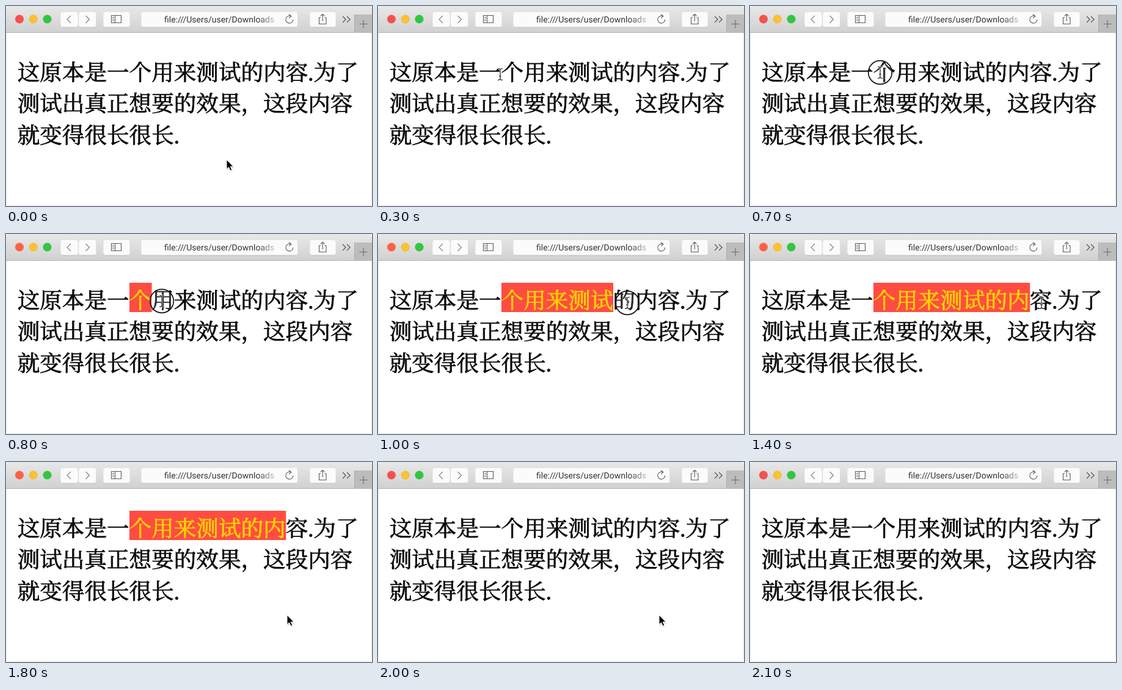
An HTML page that plays this animation: 599 px wide and 328 px high, repeating every 2.2 s.

```html
<!DOCTYPE html>
<html lang="zh-CN">
<head>
<meta charset="utf-8">
<title>Text selection</title>
<style>
html, body { margin: 0; width: 100%; height: 100%; overflow: hidden; background: #fff; }
svg { display: block; }
.page { font: 36.6px "Liberation Serif", "Noto Serif CJK SC", "Noto Sans CJK SC", "Noto Sans CJK", serif; text-rendering: geometricPrecision; }
.page text { stroke-width: .8; }
.ink { fill: #0c0c0c; stroke: #0c0c0c; }
.selected { fill: #ffd500; stroke: #ffd500; }
.url { font: 14px Roboto, "Open Sans", sans-serif; text-rendering: geometricPrecision; }
.button { fill: #fbfbfb; stroke: #cfcfcf; stroke-width: .5; }
.icon { fill: none; stroke: #5c5c5c; stroke-width: 1.1; }
</style>
</head>
<body>
<svg width="599" height="328" viewBox="0 0 599 328">
  <defs>
    <linearGradient id="bar" x2="0" y2="1">
      <stop stop-color="#e8e8e8"/><stop offset="1" stop-color="#d1d1d1"/>
    </linearGradient>
    <linearGradient id="fade" gradientUnits="userSpaceOnUse" x1="412" x2="442">
      <stop stop-color="#333"/><stop offset="1" stop-color="#333" stop-opacity=".2"/>
    </linearGradient>
    <clipPath id="urlClip"><rect x="250" y="9" width="192" height="26"/></clipPath>
    <clipPath id="selectedClip"><rect id="clipBox" x="202" y="80" height="48" width="0"/></clipPath>
    <path id="beamShape" d="M-4 -9.500Q0 -9.500 0 -7Q0 -9.500 4 -9.500M0 -7V7M-4 9.500Q0 9.500 0 7Q0 9.500 4 9.500M-2 3H2"/>
  </defs>

  <rect width="599" height="328" fill="#fff"/>
  <rect x=".5" y=".5" width="598" height="327" rx="5" fill="#fff" stroke="#e4e4e4"/>
  <path d="M0 43V5Q0 0 5 0H594Q599 0 599 5V43Z" fill="url(#bar)"/>
  <rect x="570" y="14" width="29" height="29" fill="#bcbcbc"/>
  <path d="M0 43.5H599" stroke="#b4b4b4"/>
  <path d="M570.5 14V43" stroke="#adadad"/>

  <g stroke-width=".5">
    <circle id="closeLight" cx="22" cy="21.5" r="6.700"/>
    <circle cx="44.700" cy="21.5" r="6.700" fill="#fdc130" stroke="#e0a92c"/>
    <circle cx="67.5" cy="21.5" r="6.700" fill="#2fc840" stroke="#27a937"/>
  </g>

  <g fill="#b9b9b9">
    <path d="M92 35H115M122 35H145M162 35H200M224 35H474M500 35H537" stroke="#b9b9b9" stroke-width=".8"/>
  </g>
  <g class="button">
    <rect x="89" y="9.300" width="29" height="25.300" rx="4"/>
    <rect x="118.700" y="9.300" width="29" height="25.300" rx="4"/>
    <rect x="159" y="9.300" width="44" height="25.300" rx="4"/>
    <rect x="221" y="9.300" width="256.500" height="25.300" rx="4"/>
    <rect x="497" y="9.300" width="43" height="25.300" rx="4"/>
  </g>
  <g class="icon">
    <path d="M106 16L100 22L106 28M130.500 16L136.500 22L130.500 28" stroke="#808080"/>
    <path d="M172.500 15.500H188.500V27.500H172.500ZM178.500 15.500V27.500M174.300 18.500H176.700M174.300 21H176.700M174.300 23.500H176.700"/>
    <path d="M515 19H512.500V29.500H524V19H521.500M518.200 25V13.500M515 16.500L518.200 13.200L521.400 16.500"/>
    <path d="M551 17L556 22L551 27M558 17L563 22L558 27" stroke-width="1.4"/>
    <path d="M578.500 29.500H591.500M585 23V36" stroke="#6b6b6b"/>
    <path d="M466.500 16.800A6 6 0 1 0 469.800 22M463 13.500L467 16.800L463.300 20" stroke="#666"/>
  </g>
  <text class="url" x="259" y="27" fill="url(#fade)" clip-path="url(#urlClip)">file:///Users/user/Downloads</text>

  <g class="page">
    <text class="ink" x="18.700" y="122">这原本是一个用来测试的内容.为了</text>
    <text class="ink" x="18.700" y="173.300">测试出真正想要的效果，这段内容</text>
    <text class="ink" x="18.700" y="224.600">就变得很长很长.</text>
    <g clip-path="url(#selectedClip)">
      <rect x="202" y="80" width="260" height="48" fill="#ff4c42"/>
      <text class="selected" x="18.700" y="122">这原本是一个用来测试的内容.为了</text>
    </g>
  </g>

  <g id="pointer">
    <circle id="ring" r="19.300" fill="#fff" fill-opacity=".12" stroke="#111" stroke-width="1.700"/>
    <g id="beam" fill="none">
      <use href="#beamShape" stroke="#fff" stroke-width="2.600" stroke-opacity=".8"/>
      <use href="#beamShape" stroke="#222" stroke-width="1.200"/>
    </g>
    <g id="arrow">
      <path d="M1 2V18L4.500 15L7 20L9.500 19L7.500 14H12Z" fill="#000" opacity=".15"/>
      <path d="M0 0V15.500L3.500 12.300L6 18L8.700 16.800L6.300 11.300H11Z" fill="#000" stroke="#fff"/>
    </g>
  </g>
</svg>
<script>
const LOOP = 2200, STEP = 100, CHAR = 36.6, START = 202;
const PRESS = 600, RELEASE = 1300, CLEAR = 2000, HIDE = 2100;
// time, x, y
const path = [
  [0, 361, 252], [100, 326, 222], [200, 250, 150], [300, 200, 112],
  [500, 210, 110], [700, 213, 109], [800, 255, 110], [900, 335, 112],
  [1000, 408, 113], [1100, 447, 113], [1200, 465, 112], [1400, 477, 113],
  [1500, 494, 140], [1600, 490, 190], [1700, 470, 238], [1800, 460, 251], [2200, 460, 251]
];
const el = id => document.getElementById(id);
const show = (id, on) => el(id).setAttribute("visibility", on ? "visible" : "hidden");

function position(t) {
  const i = path.findIndex(p => p[0] > t);
  const [t0, x0, y0] = path[i - 1], [t1, x1, y1] = path[i];
  const k = (t - t0) / (t1 - t0);
  return [x0 + (x1 - x0) * k, y0 + (y1 - y0) * k];
}

function selectedCount(t) {
  if (t < PRESS || t >= CLEAR) return 0;
  const [x] = position(Math.min(t, RELEASE));
  return Math.max(0, Math.floor((x - START) / CHAR));
}

function render(time) {
  const t = Math.floor(time % LOOP / STEP) * STEP;
  const [x, y] = position(t), count = selectedCount(t);
  const visible = t < HIDE, overText = y > 75 && y < 236;
  el("pointer").setAttribute("transform", `translate(${x} ${y})`);
  show("beam", visible && overText);
  show("arrow", visible && !overText);
  show("ring", t >= PRESS && t < RELEASE);
  el("clipBox").setAttribute("width", count * CHAR);
  el("closeLight").setAttribute("fill", count ? "#ff6047" : "#f9504d");
  el("closeLight").setAttribute("stroke", count ? "#e8533f" : "#dd403d");
}

const origin = performance.now();
function tick() {
  render(performance.now() - origin);
  requestAnimationFrame(tick);
}
tick();
</script>
</body>
</html>
```
